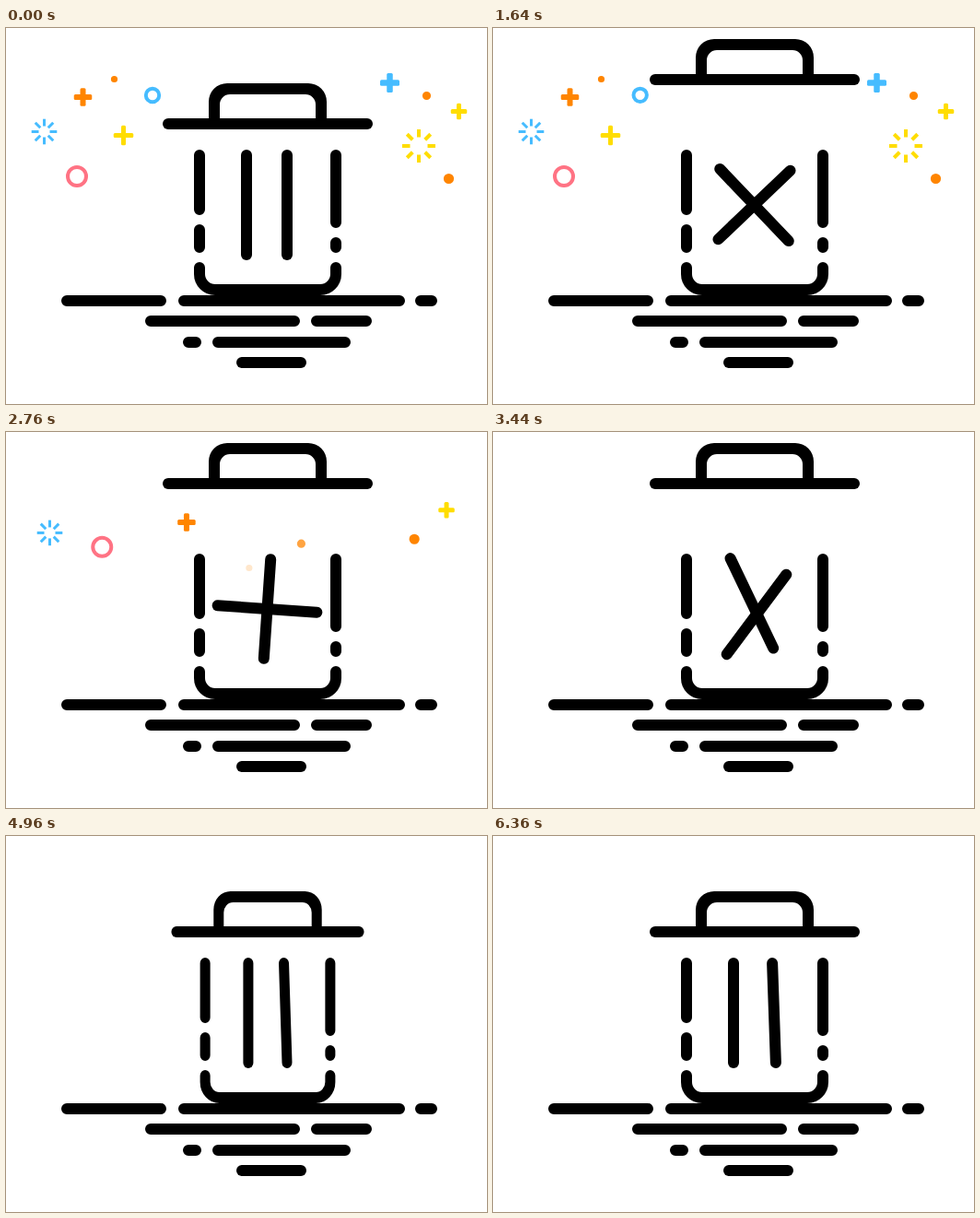
Recreate the animation shown at these times as an HTML page. Size 522 by 408 pixels, loop 7.2 s.

```html
<!DOCTYPE html>
<html lang="en">
<head>
<meta charset="utf-8">
<title>Trash bin</title>
<style>
html, body { margin: 0; width: 100%; height: 100%; overflow: hidden; background: #fff; }
svg { display: block; width: 100vw; height: 100vh; }
.line { fill: none; stroke: #000; stroke-width: 12; stroke-linecap: round; }
</style>
</head>
<body>
<svg viewBox="0 0 522 408">
  <g class="line">
    <path d="M66 296H168M193 296H427M450 296H462"/>
    <path d="M157 318H313M337 318H391"/>
    <path d="M198 341H206M230 341H368"/>
    <path d="M256 363H320"/>
  </g>
  <g id="bits" fill="none"></g>
  <g id="bin" class="line">
    <g id="lid">
      <path d="M176 104H392"/>
      <path d="M220 104V80a20 20 0 0 1 20-20H328a20 20 0 0 1 20 20V104H336V83a11 11 0 0 0-11-11H243a11 11 0 0 0-11 11V104z" fill="#000" stroke="none"/>
    </g>
    <path d="M210 138V197M210 219V238M358 138V211M358 233V238"/>
    <path d="M210 260v7a17 17 0 0 0 17 17H341a17 17 0 0 0 17-17v-7"/>
    <path id="barA" d="M0-54V54"/>
    <path id="barB" d="M0-54V54"/>
  </g>
</svg>
<script>
const LOOP = 7200, STEP = 40;
const FIRST = 1600, STAGGER = 106, FLIGHT = 1000;
const TARGET = { x: 284, y: 190 }, ARC_TOP = 55;
const ORANGE = '#ff8500', BLUE = '#46bcff', YELLOW = '#ffdd00', PINK = '#ff7384';

const $ = id => document.getElementById(id);
const part = (t, from, to) => Math.max(0, Math.min(1, (t - from) / (to - from)));
const smooth = s => s * s * (3 - 2 * s);
const ease = (t, from, to) => smooth(part(t, from, to));
const move = (el, transform) => el.setAttribute('transform', transform);

function add(parent, tag, attrs) {
  const el = document.createElementNS('http://www.w3.org/2000/svg', tag);
  for (const k in attrs) el.setAttribute(k, attrs[k]);
  return parent.appendChild(el);
}

// Particle shapes, each drawn around 0,0
const ring = (r, w) => g => add(g, 'circle', { r, 'stroke-width': w });
const dot = r => ring(r / 2, r);
const plus = (size, w) => g => {
  for (const [width, height] of [[size, w], [w, size]])
    add(g, 'rect', { x: -width / 2, y: -height / 2, width, height, rx: 1.5, fill: g.getAttribute('stroke'), stroke: 'none' });
};
const burst = (inner, outer, w) => g => {
  for (let a = 0; a < 360; a += 45)
    add(g, 'path', { d: `M0 ${-inner}V${-outer}`, 'stroke-width': w, transform: `rotate(${a})` });
};

// In order of departure; reach says how far towards the bin the arc bends
const bits = [];
function bit(x, y, reach, stroke, shape) {
  const el = add($('bits'), 'g', { stroke });
  shape(el);
  bits.push({ el, x, y, reach, start: FIRST + STAGGER * bits.length });
}
bit(159, 73, 0.6, BLUE, ring(7.2, 4));
bit(416.5, 59.5, 0.6, BLUE, plus(21, 6.5));
bit(127.5, 116.5, 0.6, YELLOW, plus(21.5, 5));
bit(448, 128, 0.6, YELLOW, burst(9.5, 18, 4));
bit(117.5, 55.5, 0.68, ORANGE, dot(3.6));
bit(456.5, 73.5, 0.73, ORANGE, dot(4.6));
bit(83.5, 75, 0.55, ORANGE, plus(19.5, 6));
bit(480.5, 163.5, 0.1, ORANGE, dot(5.6));
bit(77, 161, 0.22, PINK, ring(10, 4));
bit(491.5, 90.5, 0.27, YELLOW, plus(17.5, 5));
bit(41.5, 112.5, 0.44, BLUE, burst(6, 13.8, 3));

const curve = (a, b, c, u) => (1 - u) * (1 - u) * a + 2 * u * (1 - u) * b + u * u * c;

function drawBits(t) {
  for (const { el, x, y, reach, start } of bits) {
    const s = part(t, start, start + FLIGHT), u = smooth(s);
    const bend = x + (TARGET.x - x) * reach;
    move(el, `translate(${curve(x, bend, TARGET.x, u)} ${curve(y, ARC_TOP, TARGET.y, u)})`);
    el.setAttribute('opacity', 1 - part(s, 0.58, 0.775));
  }
}

function drawBars(t) {
  const back = ease(t, 3200, 3860);
  const cross = ease(t, 600, 1200) - back;
  const spin = 720 * ease(t, 1600, 3194) + 28 * back * (1 - back);
  // on the way back the bars circle out of the centre
  const orbit = t < 3200 ? 0 : 96 * (1 - back);
  const place = (id, side, angle) =>
    move($(id), `translate(283.5 192) rotate(${orbit}) translate(${side * (1 - cross)} 0) rotate(${angle + spin - orbit})`);
  place('barA', -22.5, -45 * cross);
  place('barB', 21.5, 45 * cross - 2 * back);
}

function drawBin(t) {
  const lift = 48 * (ease(t, 400, 800) - ease(t, 4050, 4400));
  move($('lid'), `translate(0 ${-lift})`);

  const chew = 1 - 0.05 * (1 - Math.cos(4 * Math.PI * part(t, 4800, 5680)));
  const sway = Math.sin(2 * Math.PI * part(t, 5800, 6360));
  const stretch = 1 + 0.06 * sway * sway;
  move($('bin'), `translate(284 290) matrix(${chew} 0 ${0.285 * sway} ${stretch} 0 0) translate(-284 -290)`);
}

const begin = performance.now();
function tick() {
  const now = (performance.now() - begin) % LOOP;
  const t = Math.floor(now / STEP) * STEP;
  drawBits(t);
  drawBars(t);
  drawBin(t);
  requestAnimationFrame(tick);
}
tick();
</script>
</body>
</html>
```
